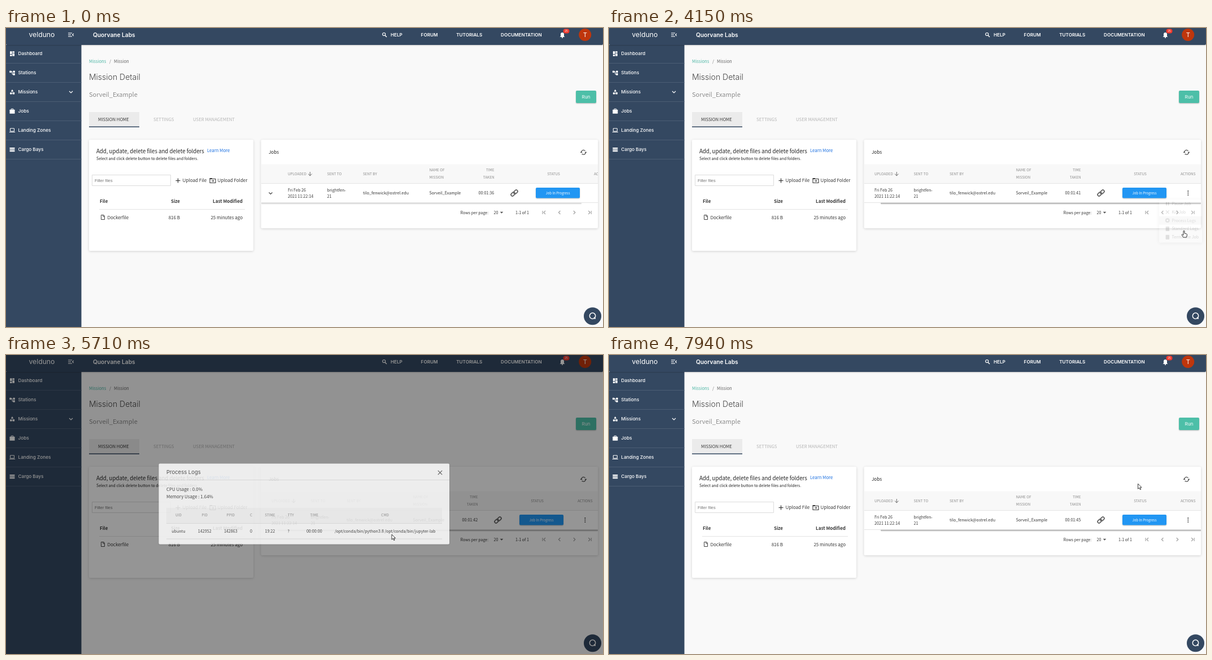
An HTML page with a canvas for the animation above (8 s loop, 1057x530 px).

```html
<!DOCTYPE html>
<html lang="en">
<head>
<meta charset="utf-8">
<title>Mission Detail</title>
<style>
html, body { margin: 0; width: 100%; height: 100%; overflow: hidden; background: #f9f9f9; }
canvas { display: block; width: 1057px; height: 530px; }
</style>
</head>
<body>
<canvas id="stage" width="1057" height="530"></canvas>
<script>
const W = 1057, H = 530, LOOP = 8000, STEP = 77.2;
const SANS = '"Noto Sans CJK JP", "Noto Sans CJK SC", "Noto Sans CJK", Lato, sans-serif';
const WIDE = 'Inter, "Open Sans", sans-serif';
const NAVY = '#344861', INK = '#383838', MUTED = '#8c8c8c', RULE = '#e4e4e4';
const PROJECT = 'Sorveil_Example';

const screen = document.getElementById('stage').getContext('2d');
const layer = Object.assign(document.createElement('canvas'), { width: W, height: H }).getContext('2d');
let g = screen;

const ease = v => { v = Math.max(0, Math.min(1, v)); return v * v * (3 - 2 * v); };
const mix = (a, b, k) => a + (b - a) * k;

// y is the middle of the capitals; returns the width
function text(s, x, y, size, color = INK, { weight = 400, family = SANS, align = 'left' } = {}) {
  g.font = `${weight} ${size}px ${family}`;
  g.fillStyle = color;
  g.textAlign = align;
  g.fillText(s, x, y + size * 0.366);
  return g.measureText(s).width;
}
function rect(x, y, w, h, color, r = 0) {
  g.fillStyle = color;
  g.beginPath();
  g.roundRect(x, y, w, h, r);
  g.fill();
}
function frame(x, y, w, h, color, width = 1, r = 0) {
  g.strokeStyle = color;
  g.lineWidth = width;
  g.beginPath();
  g.roundRect(x, y, w, h, r);
  g.stroke();
}
function disc(x, y, r, color) {
  g.fillStyle = color;
  g.beginPath();
  g.arc(x, y, r, 0, 7);
  g.fill();
}
function ring(x, y, r, color, width, from = 0, to = Math.PI * 2) {
  g.strokeStyle = color;
  g.lineWidth = width;
  g.beginPath();
  g.arc(x, y, r, from, to);
  g.stroke();
}
function line(color, width, ...p) {
  g.strokeStyle = color;
  g.lineWidth = width;
  g.beginPath();
  for (let i = 0; i < p.length; i += 2) g.lineTo(p[i], p[i + 1]);
  g.stroke();
}
function triangle(x, y, w, h, color) {
  g.fillStyle = color;
  g.beginPath();
  g.moveTo(x - w / 2, y);
  g.lineTo(x + w / 2, y);
  g.lineTo(x, y + h);
  g.fill();
}
function place(x, y, draw, angle = 0) {
  g.save();
  g.translate(x, y);
  g.rotate(angle);
  draw();
  g.restore();
}
// a V that points down at angle 0
const chevron = (x, y, r, color, angle = 0) =>
  place(x, y, () => line(color, 1.2, -r, -r / 2, 0, r / 2, r, -r / 2), angle);
function arrow(x, y, r, color, angle = 0) {
  place(x, y, () => {
    line(color, 1, 0, -r, 0, r);
    line(color, 1, -r, 0, 0, r, r, 0);
  }, angle);
}
function cross(x, y, r, color, angle = Math.PI / 4) {
  place(x, y, () => {
    line(color, 1.2, -r, 0, r, 0);
    line(color, 1.2, 0, -r, 0, r);
  }, angle);
}
function raised(x, y, w, h, color = '#fff', alpha = 0.16, blur = 4) {
  g.save();
  g.shadowBlur = blur;
  g.shadowOffsetY = 1;
  g.shadowColor = `rgba(0,0,0,${alpha})`;
  rect(x, y, w, h, color, 2);
  g.restore();
}
function fade(alpha, draw) {
  if (alpha <= 0) return;
  layer.clearRect(0, 0, W, H);
  g = layer;
  draw();
  g = screen;
  g.globalAlpha = alpha;
  g.drawImage(layer.canvas, 0, 0);
  g.globalAlpha = 1;
}

const block = (x, y, w, h) => rect(x, y, w, h, '#fff', 0.4);
const NAV = {
  'Dashboard'() {
    for (const side of [-1, 1]) {
      block(side * 2.2 - 1.8, side > 0 ? -0.5 : -4, 3.6, 5);
      block(side * 2.2 - 1.8, side > 0 ? -4 : 2, 3.6, 2.6);
    }
  },
  'Stations'() {
    block(-4.7, -3.5, 3.4, 3.4);
    for (const y of [-3.5, 1]) block(1.4, y, 3.4, 3.4);
    line('#fff', 1, -2, -1.8, 0, -1.8, 0, 2.7, 2, 2.7);
  },
  'Missions'() {
    triangle(0, -0.5, 4.6, -4, '#fff');
    disc(-2.2, 2.5, 1.9, '#fff');
    block(0.5, 0.7, 3.6, 3.6);
  },
  'Jobs'() {
    block(-4.5, -2.5, 9, 7);
    frame(-1.8, -4, 3.6, 3, '#fff');
  },
  'Landing Zones'() {
    frame(-3.5, -3.3, 7, 5, '#fff');
    block(-5.2, 2.7, 10.4, 1.1);
  },
  'Cargo Bays'() {
    for (let i = 0; i < 3; i++) block(-4.5, -3.2 + 2.6 * i, 9, 1.9);
  }
};

function sidebar() {
  rect(0, 30, 133.5, 500, NAVY);
  Object.entries(NAV).forEach(([name, icon], i) => {
    const y = 45.3 + 34 * i;
    place(11, y, icon);
    text(name, 21.5, y, 8.2, '#fff', { weight: 500, family: WIDE });
    rect(0, Math.round(y + 16.7), 133.5, 1, '#4b5d74');
  });
  chevron(115, 113.5, 3, '#fff');
}

function header() {
  raised(0, -2, W, 32, NAVY, 0.2, 2);
  text('velduno', 40.5, 12, 12.2, '#fff', { family: WIDE });
  for (let i = -1; i < 2; i++) line('#fff', 1.1, 110, 12 + 3 * i, 115 + 2 * Math.abs(i), 12 + 3 * i);
  chevron(118.7, 12, 2.2, '#fff', Math.PI / 2);
  text('Quorvane Labs', 154, 12.5, 10.2, '#fff', { weight: 600, family: WIDE });
  ring(669.2, 11, 2.5, '#fff', 1.2);
  line('#fff', 1.4, 671, 13, 674, 16);
  let x = 681;
  for (const s of ['HELP', 'FORUM', 'TUTORIALS', 'DOCUMENTATION'])
    x += text(s, x, 12.5, 8.15, '#fff', { weight: 600, family: WIDE }) + 32.8;
  rect(982, 8, 6, 7, '#fff', [3, 3, 0, 0]);
  triangle(985, 16, 9, -4, '#fff');
  disc(985, 17, 1.1, '#fff');
  rect(986.5, 1.5, 11, 8, '#f03a2e', 4);
  text('25', 992, 5.5, 4.6, '#fff', { family: WIDE, align: 'center' });
  disc(1025.2, 12, 11, '#bf360c');
  text('T', 1025.2, 12.3, 11, '#fff', { family: WIDE, align: 'center' });
}

function pageTop() {
  text('Missions', 147, 59, 7.6, '#4db6a5');
  text('/', 183, 59, 7.6, '#777');
  text('Mission', 191, 59, 7.6, '#666');
  text('Mission Detail', 147, 86.5, 14, '#444', { weight: 300, family: WIDE });
  text(PROJECT, 147, 117.5, 11, MUTED, { weight: 300 });
  raised(1009, 111, 36, 22, '#4dbfa8', 0.25, 2);
  text('Run', 1027, 122, 8, '#fff', { align: 'center' });
  rect(147, 149, 89, 27, '#ebebeb');
  rect(147, 174.6, 89, 1.4, NAVY);
  text('MISSION HOME', 163, 162.5, 7.7);
  text('SETTINGS', 261, 162.5, 7.8, '#b5b5b5');
  text('USER MANAGEMENT', 331, 162.5, 7.8, '#b5b5b5');
}

function filesCard() {
  raised(147, 198, 291, 197);
  text('Add, update, delete files and delete folders', 160, 218.5, 9.65, '#222');
  text('Learn More', 356, 217.5, 7.75, '#1a6fe0');
  text('Select and click delete button to delete files and folders.', 160, 231, 6.95, '#222');
  frame(152.5, 260.5, 139, 19, '#dcdcdc');
  text('Filter files', 157, 270, 7.4, '#757575', { family: '"Liberation Sans", sans-serif' });
  cross(304.5, 270.5, 4, INK, 0);
  text('Upload File', 312.5, 270.5, 8.1);
  frame(361, 267.5, 10, 7, INK, 1.1);
  rect(360.5, 266, 4.5, 1.5, INK);
  arrow(366, 271, 1.9, INK, -Math.PI / 2);
  text('Upload Folder', 374.5, 270.5, 8);
  const row = (y, weight, name, nameX, size, date) => {
    text(name, nameX, y, 8, INK, { weight });
    text(size, 308, y, 8, INK, { weight, align: 'right' });
    text(date, 419, y, 8, INK, { weight, align: 'right' });
  };
  row(307.5, 700, 'File', 166, 'Size', 'Last Modified');
  rect(165, 321, 258, 1, RULE);
  row(336, 400, 'Dockerfile', 179.5, '816 B', '25 minutes ago');
  frame(168.5, 331.5, 6, 8, '#444', 1, [0, 2.5, 0, 0]);
  line('#444', 0.9, 171.8, 331.5, 171.8, 334.3, 174.5, 334.3);
}

function linkIcon() {
  for (const side of [-1, 1]) frame(side * 3 - 4, side * 0.3 - 2.5, 8, 5, '#666', 1.8, 2.5);
}

function jobsTable(scroll, seconds) {
  const head = (s, x, dy = 0, align) => text(s, x, 258.2 + dy, 6.35, MUTED, { align });
  const cell = (s, x, dy = 0) => text(s, x, 292.8 + dy, 7.15);
  const pair = (draw, a, b, x, dy, align) => { draw(a, x, -dy, align); draw(b, x, dy, align); };
  g.save();
  g.beginPath();
  g.rect(452, 240, 596, 75);
  g.clip();
  rect(452, 241.5, 596, 34, '#f8f8f8');
  rect(452, 275, 596, 1, RULE);
  rect(452, 309, 596, 1, RULE);
  g.translate(29 - scroll, 0);
  head('UPLOADED', 470);
  arrow(509.3, 258.5, 3.4, '#666');
  head('SENT TO', 539.5);
  head('SENT BY', 603);
  pair(head, 'NAME OF', 'MISSION', 720.5, 6.7);
  pair(head, 'TIME', 'TAKEN', 835.5, 6.7, 'right');
  head('STATUS', 940.5, 0, 'center');
  head('ACTIONS', 1012);
  chevron(439.5, 293, 3, '#444');
  pair(cell, 'Fri Feb 26', '2021 11:22:14', 470, 5.7);
  pair(cell, 'brightfen-', '21', 539.5, 5.7);
  cell('tilo_fenwick@ostrel.edu', 603);
  cell(PROJECT, 720.5);
  cell('00:01:' + seconds, 807.5);
  place(871, 292.5, linkIcon, -Math.PI / 4);
  raised(909, 283, 78, 18.5, '#2196f3', 0.25, 2);
  text('Job In Progress', 948, 292.7, 6, '#fff', { weight: 500, align: 'center' });
  for (let i = -1; i < 2; i++) disc(1025.3, 292.6 + 3.4 * i, 1.1, '#555');
  g.restore();
}

function refreshIcon() {
  for (const turn of [0, Math.PI]) place(0, 0, () => {
    ring(0, 0, 3.9, '#444', 1.1, 0.15, 2.45);
    triangle(3.9, -0.6, 4.2, 2.3, '#444');
  }, turn);
}

function jobsCard(t, seconds) {
  const scroll = 29 * ease((t - 1500) / 340);
  raised(451.5, 198, 596.5, 157);
  text('Jobs', 465, 220.5, 8.1, '#222');
  place(1022.5, 220.3, refreshIcon);
  jobsTable(scroll, seconds);
  rect(452 + scroll, 309.7, 567, 2.6, scroll ? '#bebebe' : '#dedede', 1);
  text('Rows per page:', 804.5, 327.3, 7.05);
  text('20', 863.5, 327.3, 7.05);
  triangle(877.5, 325.8, 5.6, 3, '#555');
  text('1-1 of 1', 902, 327.3, 7.05);
  for (let i = 0; i < 4; i++) {
    const x = 953.5 + 26.4 * i, side = i < 2 ? 1 : -1;
    chevron(x, 327, 3, '#a0a0a0', side * Math.PI / 2);
    if (i % 3 === 0) line('#a0a0a0', 1.1, x - 3.5 * side, 324, x - 3.5 * side, 330);
  }
}

const ROW = 14.8, rowY = i => 311.5 + ROW * i;

function menu(hovered) {
  raised(974, 304, 76, 76.5, '#fff', 0.3, 7);
  const grey = '#757575';
  const icons = [
    y => { for (const x of [986, 989.6]) rect(x, y - 3, 2, 6, grey); },
    y => cross(988.8, y, 4, grey),
    y => { disc(988.8, y, 4, grey); disc(988.8, y, 1.4, '#fff'); },
    y => rect(985.6, y - 4, 6.5, 8, grey, 1),
    y => rect(985.6, y - 4, 6.5, 8, grey, 1)
  ];
  ['Pause Job', 'Kill Job', 'Process Logs', 'Standard Logs', 'Terminate Job'].forEach((label, i) => {
    if (i === hovered) rect(974, rowY(i - 0.5), 76, ROW, RULE);
    icons[i](rowY(i));
    text(label, 996.5, rowY(i), 7.1, '#444');
  });
}

const PROCESS = {
  UID: 'ubuntu', PID: '142952', PPID: '142863', C: '0', STIME: '19:22', TTY: '?',
  TIME: '00:00:00', CMD: '/opt/conda/bin/python3.8 /opt/conda/bin/jupyter-lab'
};
const CLOSE = [768.5, 208.5];

function dialog(hoverClose) {
  raised(270.5, 192.5, 514.5, 143, '#fff', 0.12, 3);
  text('Process Logs', 284, 207.3, 9.5, '#444', { family: WIDE });
  rect(271, 221, 514, 1, RULE);
  if (hoverClose) disc(...CLOSE, 13, '#e6e6e6');
  cross(...CLOSE, 5.2, '#555');
  text('CPU Usage : 0.0%', 284, 238, 7.9);
  text('Memory Usage : 1.64%', 284, 251.3, 7.9);
  rect(284, 271, 488, 27, '#f8f8f8');
  rect(284, 298, 488, 1, RULE);
  rect(284, 325.5, 488, 1, RULE);
  // each column is as wide as its longer text plus padding
  let left = 282;
  for (const [name, value] of Object.entries(PROCESS)) {
    g.font = `7.13px ${SANS}`;
    const width = Math.max(g.measureText(name).width * 0.89, g.measureText(value).width) + 22.3;
    const x = left + width / 2;
    text(name, x, 284, 6.35, MUTED, { align: 'center' });
    text(value, value === '?' ? x - 4 : x, 312.3, 7.13, INK, { align: 'center' });
    left += width;
  }
}

function chatButton() {
  disc(1038.5, 510.8, 15.5, NAVY);
  ring(1038.5, 510.3, 5.2, '#fff', 1.5);
  line('#fff', 2, 1041, 513, 1043.5, 515.5);
}

// when the pointer sets off, and where to
const MOVES = [
  [300, 1018, 512], [450, 680, 312], [1530, 709, 312], [2000, 1020, 302], [2470, 1023, 290],
  [3230, 1020, 338], [3920, 1018, 359], [4850, 683, 318], [6240, 304.5, 242],
  [7060, 771.5, 213], [7710, 1000, 234]];

function pointerAt(t) {
  if (t < MOVES[0][0]) return null;
  let [, x, y] = MOVES[0];
  for (const [start, toX, toY] of MOVES) {
    const duration = Math.min(540, 150 + 0.9 * Math.hypot(toX - x, toY - y));
    const k = ease((t - start) / duration);
    x = mix(x, toX, k);
    y = mix(y, toY, k);
    if (k < 1) break;
  }
  return [x, y];
}

const ARROW = new Path2D('M0 0V9.2L2.2 7.2L3.8 10.6L5.2 10L3.7 6.7H6.6Z');
const HAND = new Path2D('M-1 1Q0 -.6 1 1V5L4.6 5.8Q5.6 6.2 5.4 8L4.4 12H-1.2L-4 7.6Q-3.6 6.2 -2.4 7L-1 8.4Z');

function pointer([x, y], kind) {
  place(x, y, () => {
    if (kind === 'beam') {
      line('#222', 1, 0, -4.8, 0, 4.8);
      for (const end of [-4.8, 4.8]) line('#222', 1, -2, end, 2, end);
      return;
    }
    const outline = kind === 'hand' ? HAND : ARROW;
    g.fillStyle = '#fff';
    g.strokeStyle = '#222';
    g.lineWidth = 0.9;
    g.fill(outline);
    g.stroke(outline);
  });
}

const MENU_OPEN = 2960, MENU_CLOSE = 3965, DIALOG_OPEN = 5537, DIALOG_CLOSE = 7645;

function draw(time) {
  const t = 300 + Math.floor((time - 290) / STEP) * STEP; // 13 pictures a second
  // the list reloads when the dialog closes
  const seconds = 37 + Math.floor((t - 140) / 1000) + (t > DIALOG_CLOSE ? 1 : 0);
  const at = pointerAt(t);
  const menuAlpha = ease((t - MENU_OPEN) / 230) * (1 - ease((t - MENU_CLOSE) / 270));
  const open = ease((t - DIALOG_OPEN) / 225) * (1 - ease((t - DIALOG_CLOSE) / 195));
  const hovered = at && at[1] > 304 ? Math.min(2, Math.round((at[1] - rowY(0)) / ROW)) : -1;
  const onClose = open > 0 && Math.hypot(at[0] - CLOSE[0], at[1] - CLOSE[1]) < 13;
  const onMenu = t > MENU_OPEN - 400 && t < MENU_CLOSE + 560;

  rect(0, 0, W, H, '#f9f9f9');
  sidebar();
  header();
  pageTop();
  filesCard();
  jobsCard(t, seconds);
  chatButton();
  fade(menuAlpha, () => menu(hovered));
  rect(0, 0, W, H, `rgba(0,0,0,${0.5 * open})`);
  fade(open, () => dialog(onClose));
  if (at) pointer(at, onMenu || onClose ? 'hand' : open > 0.9 && at[0] < 420 ? 'beam' : 'arrow');
}

function loop() {
  draw(performance.now() % LOOP);
  requestAnimationFrame(loop);
}
loop();
</script>
</body>
</html>
```
